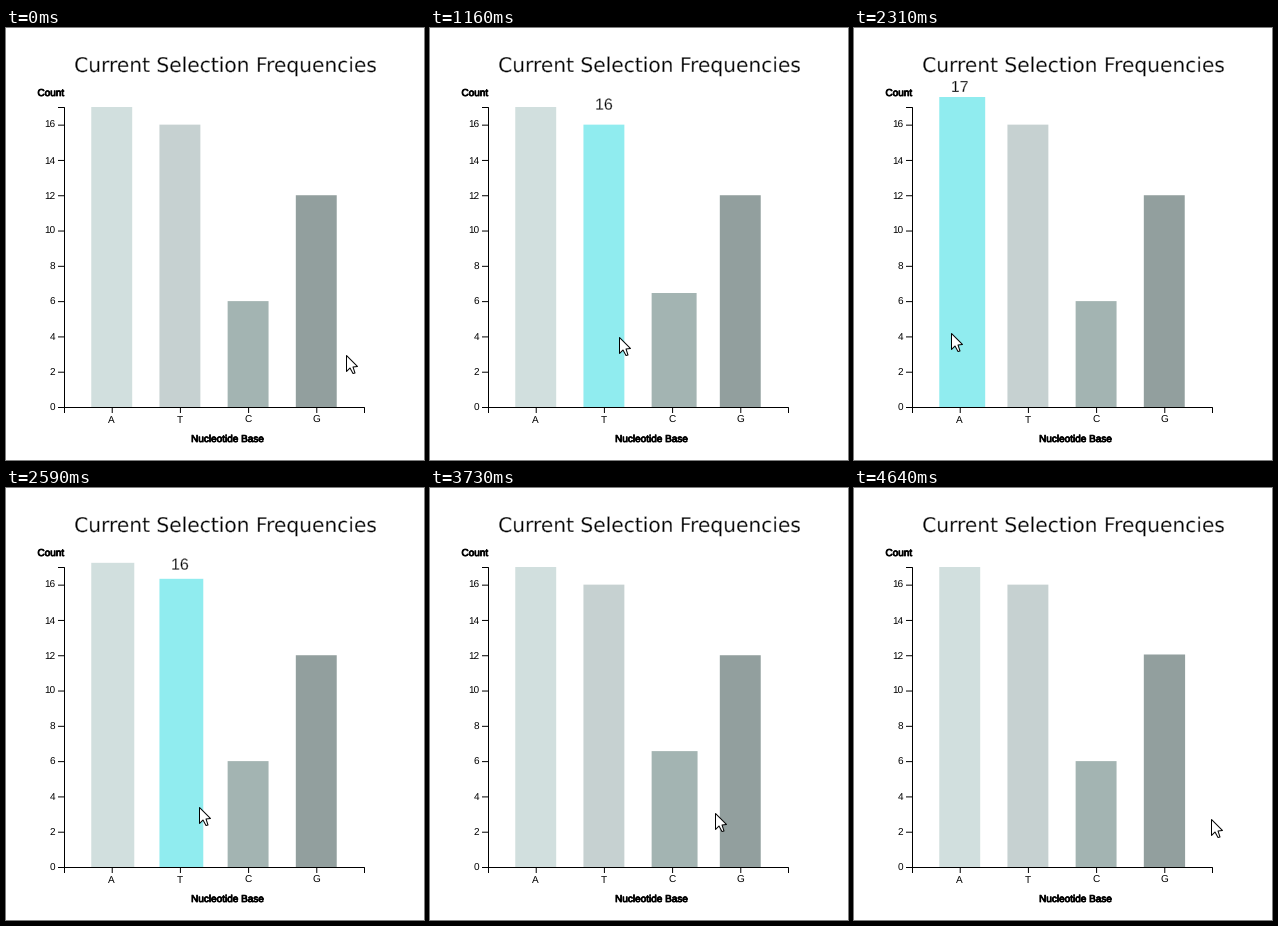
Write a matplotlib script that moves like this. It is 418 by 432 pixels and loops after 4870 ms.

```python
import numpy as np
import matplotlib.pyplot as plt
from matplotlib.animation import FuncAnimation
from matplotlib.patches import Polygon, Rectangle
from matplotlib.patheffects import Normal, Stroke, withStroke

plt.rcParams["text.hinting"] = "none"

W, H, DPI = 418, 432, 64
PX = 72 / DPI                      # points per pixel
LOOP, TICK = 4870, 10

LEFT, TOP, SIZE = 58, 79, 300      # plot area
BASE = TOP + SIZE
NAMES = "ATCG"
COUNTS = dict(zip(NAMES, (17, 16, 6, 12)))
COLORS = dict(zip(NAMES, ("#d1dfde", "#c6d1d1", "#a3b4b2", "#929f9e")))
HOVER = "#90ecef"
STEP = SIZE / 4.4                  # band scale with padding 0.4
BAND = STEP * 0.6

# The pointer rests at each stop, then glides to the next one.
STARTS = (-20, 540, 1010, 1570, 2310, 2920, 3560, 4310)
STOPS = np.array([(340, 327), (294, 324), (231, 316), (166, 305), (97, 305),
                  (193, 319), (244, 324), (308, 326), (357, 331)])
GLIDE, CADENCE = 250, 50
GROW_W, GROW_H, GROW_MS = 5, 10, 180

ARROW = np.array([(0, 0), (0, 16), (3.5, 12.5), (6.5, 18), (8.5, 17.5),
                  (6.5, 11.5), (11, 11)]) + 0.5


def bar_x(name):
    return LEFT + STEP * (0.4 + NAMES.index(name))


def value_y(value):
    return BASE - SIZE * value / 17


def ease(u):
    u = min(max(u, 0), 1)
    return u * u * (3 - 2 * u)


def last_move(t):
    return sum(start <= t for start in STARTS) - 1


def snap(t):
    """Time of the latest screen update."""
    return t - (t - STARTS[last_move(t)]) % CADENCE


def pointer_at(t):
    i = last_move(t)
    progress = ease((t - STARTS[i]) / GLIDE)
    return STOPS[i] + (STOPS[i + 1] - STOPS[i]) * progress


def hovered(name, t):
    return 0 <= pointer_at(t)[0] - bar_x(name) <= BAND + GROW_W


def hover_switches(name):
    """Times at which the pointer enters and leaves, alternating."""
    updates = sorted({snap(t) for t in range(0, LOOP, TICK)})
    return [b for a, b in zip(updates, updates[1:])
            if hovered(name, a) != hovered(name, b)]


SWITCHES = {name: hover_switches(name) for name in NAMES}


def growth(name, t):
    return sum((-1)**k * ease((t - switch) / GROW_MS)
               for k, switch in enumerate(SWITCHES[name]))


fig = plt.figure(figsize=(W / DPI, H / DPI), dpi=DPI, facecolor="white")
ax = fig.add_axes([0, 0, 1, 1])
ax.set(xlim=(0, W), ylim=(H, 0))
ax.axis("off")


def line(xs, ys):
    ax.plot(xs, ys, color="black", lw=PX, snap=False,
            solid_capstyle="butt", solid_joinstyle="miter")


def text(x, y, label, size=10, font="Liberation Sans", ha="center", **kw):
    return ax.text(x, y, label, fontsize=size * PX, family=font,
                   ha=ha, va="baseline", **kw)


bold = [withStroke(linewidth=0.8 * PX, foreground="black")]
thin = [Normal(), Stroke(linewidth=0.4 * PX, foreground="white")]

bars, labels = {}, {}
for name in NAMES:
    x, y = bar_x(name), value_y(COUNTS[name])
    mid = x + BAND / 2
    bars[name] = ax.add_patch(Rectangle((x, y), BAND, BASE - y, lw=0,
                                        snap=False))
    labels[name] = text(mid, y - 15, str(COUNTS[name]), 16,
                        path_effects=thin, zorder=4)
    line((mid + 0.5, mid + 0.5), (BASE, BASE + 6))
    text(mid, BASE + 16, name)

for value in range(0, 17, 2):
    y = value_y(value) + 0.5
    line((LEFT - 6, LEFT), (y, y))
    text(LEFT - 8.5, y + 3.2, str(value), ha="right")

line((LEFT - 6, LEFT + 0.5, LEFT + 0.5, LEFT - 6),
     (TOP + 0.5, TOP + 0.5, BASE + 0.5, BASE + 0.5))
line((LEFT + 0.5, LEFT + 0.5, LEFT + SIZE + 0.5, LEFT + SIZE + 0.5),
     (BASE + 6, BASE + 0.5, BASE + 0.5, BASE + 6))

text(44.8, 68, "Count", path_effects=bold)
text(221.5, 414, "Nucleotide Base", path_effects=bold)
text(219.8, 44, "Current Selection Frequencies", 20.2, "DejaVu Sans",
     path_effects=thin)

pointer = ax.add_patch(Polygon(ARROW, closed=True, fc="white", ec="black",
                               lw=PX, joinstyle="round", snap=False,
                               zorder=5))


def draw(frame):
    now = snap(frame * TICK)
    for name, bar in bars.items():
        grown, active = growth(name, now), hovered(name, now)
        top = value_y(COUNTS[name]) - GROW_H * grown
        bar.set_bounds(bar_x(name), top, BAND + GROW_W * grown, BASE - top)
        bar.set_facecolor(HOVER if active else COLORS[name])
        labels[name].set_visible(active)
    pointer.set_xy(ARROW + np.round(pointer_at(now)))
    return [*bars.values(), *labels.values(), pointer]


anim = FuncAnimation(fig, draw, frames=LOOP // TICK, interval=TICK,
                     repeat=True, repeat_delay=0, cache_frame_data=False)
plt.show()
```
